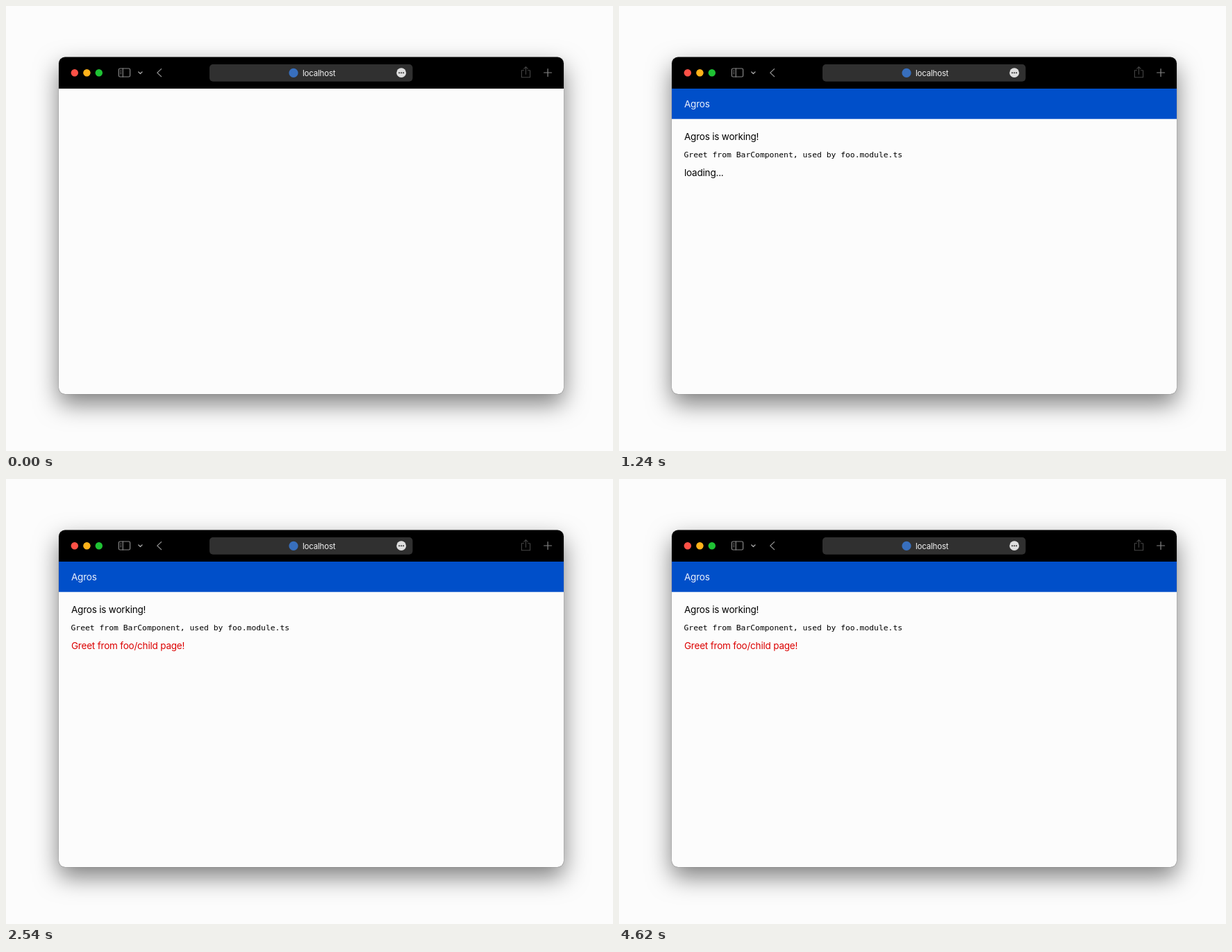
Animation of 874x641 px, one loop 4.98 s. Source, as an HTML page:

```html
<!DOCTYPE html>
<html lang="en">
<head>
<meta charset="utf-8">
<title>Loading demo</title>
<style>
  html, body { margin: 0; width: 100%; height: 100%; overflow: hidden; background: #fcfcfc; }
  .window {
    position: absolute; left: 76px; top: 73.5px; width: 727px; height: 485px;
    border-radius: 9px; background: #fcfcfc;
    box-shadow: 0 0 1px rgba(0, 0, 0, .75), 0 14px 34px rgba(0, 0, 0, .5);
  }
  svg { position: absolute; left: 0; top: 0; }
  text { font: 13.5px Inter, sans-serif; letter-spacing: -.2px; }
  .mono { font: 11.36px "DejaVu Sans Mono", monospace; letter-spacing: 0; }
  .icon { fill: none; stroke: #858585; stroke-width: 1.2; stroke-linecap: round; stroke-linejoin: round; }
</style>
</head>
<body>
<div class="window"></div>
<svg width="874" height="641" viewBox="0 0 874 641">
  <path d="M76 119V82.5a9 9 0 0 1 9-9H794a9 9 0 0 1 9 9V119Z"/>
  <circle cx="98.8" cy="96.3" r="5.2" fill="#ff5147"/>
  <circle cx="116.4" cy="96.3" r="5.2" fill="#ffb21a"/>
  <circle cx="133.8" cy="96.3" r="5.2" fill="#1fc234"/>

  <g class="icon">
    <rect x="162.4" y="90" width="16.2" height="12" rx="1.8"/>
    <path d="M168.3 90V102"/>
    <path d="M164.6 93h1.4M164.6 95.3h1.4M164.6 97.6h1.4" stroke-width=".9"/>
    <path d="M190.8 95l2.6 2.5 2.6-2.5" stroke="#a0a0a0" stroke-width="1.4"/>
    <path d="M223.6 90.6l-5.8 5.5 5.8 5.5" stroke="#969696" stroke-width="1.3"/>
    <path d="M745.6 92.8H742.4V102.8H754.6V92.8H751.4M748.5 98.3V87.8M745.8 90.3l2.7-2.6 2.7 2.6" stroke="#454545" stroke-width="1.1"/>
    <path d="M774.6 96H785.6M780.1 90.5V101.5"/>
  </g>

  <rect x="293" y="84" width="292.5" height="24.8" rx="5" fill="#303030"/>
  <circle cx="414" cy="96.4" r="6.6" fill="#386fbd"/>
  <text x="427" y="101" fill="#f2f2f2" style="font-size:11.5px">localhost</text>
  <circle cx="569.2" cy="96.2" r="6.9" fill="#dedede"/>
  <g fill="#303030">
    <circle cx="566.2" cy="96.2" r="1.05"/>
    <circle cx="569.2" cy="96.2" r="1.05"/>
    <circle cx="572.2" cy="96.2" r="1.05"/>
  </g>

  <g id="page">
    <rect x="76" y="119" width="727" height="43.7" fill="#004fc9"/>
    <text x="94" y="146" fill="#eef3fc">Agros</text>
    <g id="content">
      <text x="94" y="193">Agros is working!</text>
      <text class="mono" x="93.5" y="217.8">Greet from BarComponent, used by foo.module.ts</text>
    </g>
    <text id="status" x="94"></text>
  </g>
</svg>
<script>
  const LOOP = 4980, HEADER = 680, CONTENT = 1240, CHILD = 1800;
  const [page, content, status] = ["page", "content", "status"].map(id => document.getElementById(id));
  const show = (el, on) => el.setAttribute("visibility", on ? "visible" : "hidden");
  let stage = -1;

  function draw() {
    const t = performance.now() % LOOP;
    const next = [HEADER, CONTENT, CHILD].filter(start => t >= start).length;
    if (next !== stage) {
      stage = next;
      show(page, stage > 0);
      show(content, stage > 1);
      status.textContent = stage > 2 ? "Greet from foo/child page!" : "loading...";
      status.setAttribute("fill", stage > 2 ? "#dc0000" : "#000");
      status.setAttribute("y", stage > 1 ? 245 : 193);
    }
    requestAnimationFrame(draw);
  }
  draw();
</script>
</body>
</html>
```
